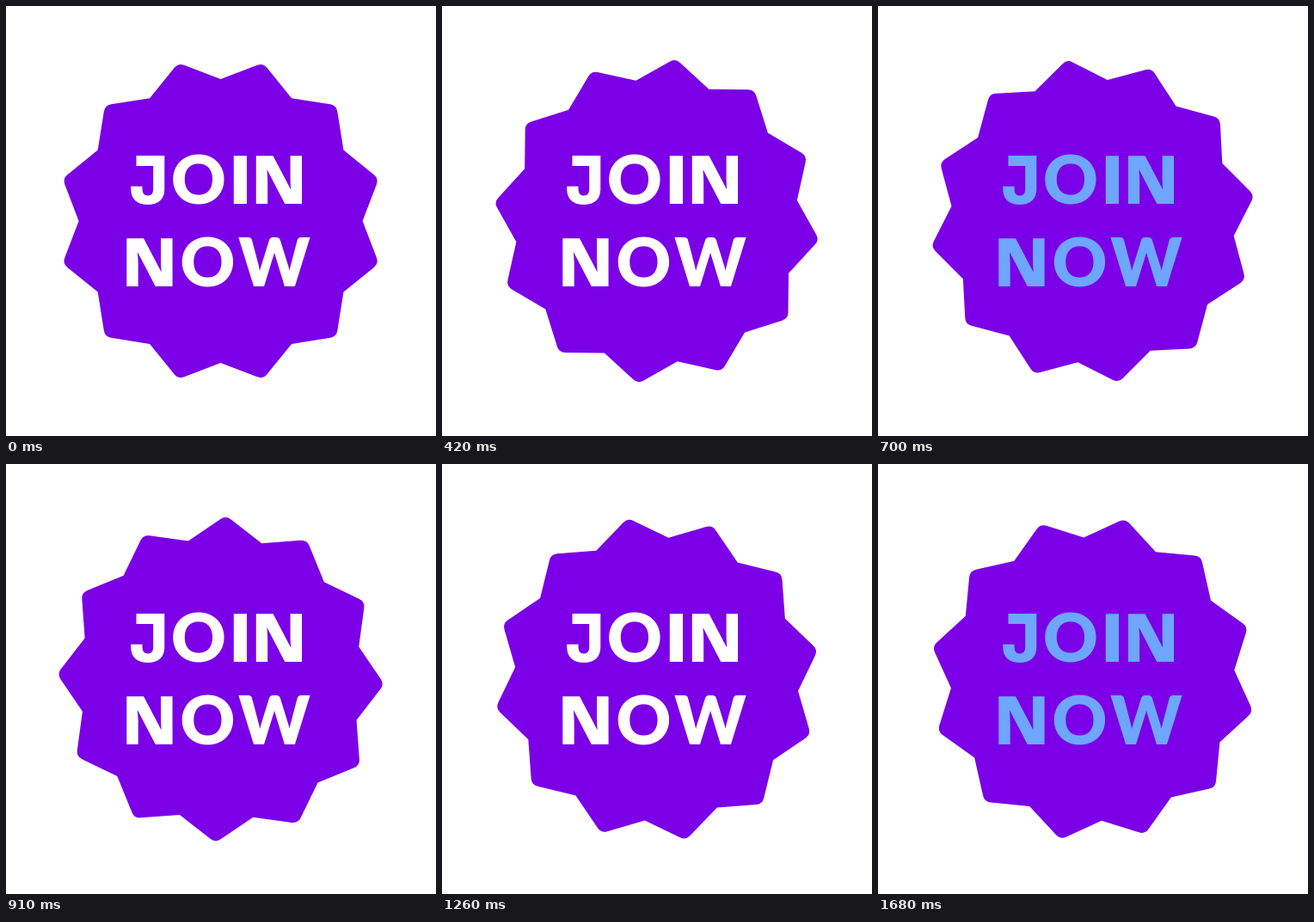
These frames come from a looping animation (500x500 px, 1750 ms). An HTML page:

```html
<!DOCTYPE html>
<html lang="en">
<head>
<meta charset="utf-8">
<title>Join now</title>
<style>
  html, body { margin: 0; width: 100%; height: 100%; overflow: hidden; background: #fff; }
  svg { display: block; width: 100%; height: 100%; }
  text { font: 800 78.4px "Open Sans", sans-serif; text-anchor: middle; }
  .hook { font: 800 77px Inter, sans-serif; }
  .wide { font: 900 78.4px Lato, sans-serif; }
</style>
</head>
<body>
<svg viewBox="0 0 500 500">
  <path id="badge" fill="#7b00e7"/>
  <g id="label">
    <rect x="151.5" y="174" width="24" height="12"/>
    <text y="230"><tspan class="hook" x="166">J</tspan><tspan class="wide" x="224">O</tspan><tspan x="272.3 317.5">IN</tspan></text>
    <text y="326"><tspan x="167">N</tspan><tspan class="wide" x="234.5 312">OW</tspan></text>
  </g>
</svg>
<script>
  const LOOP = 1750, STEP = 70, STEPS = LOOP / STEP;
  const POINTS = 12, INNER = 165, CAP_DIST = 178, CAP = 10;
  const COLORS = ["#fff", "#6ea6ff"];
  const badge = document.getElementById("badge");
  const label = document.getElementById("label");

  // Star with sharp notches and round tips whose edges are tangent to the cap.
  function starPath() {
    const half = Math.PI / POINTS;
    const dx = INNER * Math.sin(half);
    const dy = CAP_DIST - INNER * Math.cos(half);
    const slope = Math.atan2(dy, dx) + Math.asin(CAP / Math.hypot(dx, dy));
    const tx = CAP * Math.sin(slope);
    const ty = CAP_DIST + CAP * Math.cos(slope);
    let d = "";
    for (let k = 0; k < POINTS; k++) {
      const a = 2 * half * k, c = Math.cos(a), s = Math.sin(a);
      const at = (x, y) => (x * c + y * s).toFixed(2) + " " + (x * s - y * c).toFixed(2);
      d += (k ? "L" : "M") + at(-dx, INNER * Math.cos(half)) +
        "L" + at(-tx, ty) + `A${CAP} ${CAP} 0 0 1 ` + at(tx, ty);
    }
    return d + "Z";
  }

  function draw(ms) {
    const step = Math.floor((ms % LOOP) / STEP);
    const angle = 15 + 90 * step / STEPS;
    const blink = Math.floor(4 * step / STEPS) % 2;
    badge.setAttribute("transform", `translate(249.6 250.1) rotate(${angle})`);
    label.setAttribute("fill", COLORS[blink]);
  }

  badge.setAttribute("d", starPath());
  const start = performance.now();
  function tick() {
    draw(performance.now() - start);
    requestAnimationFrame(tick);
  }
  tick();
</script>
</body>
</html>
```
